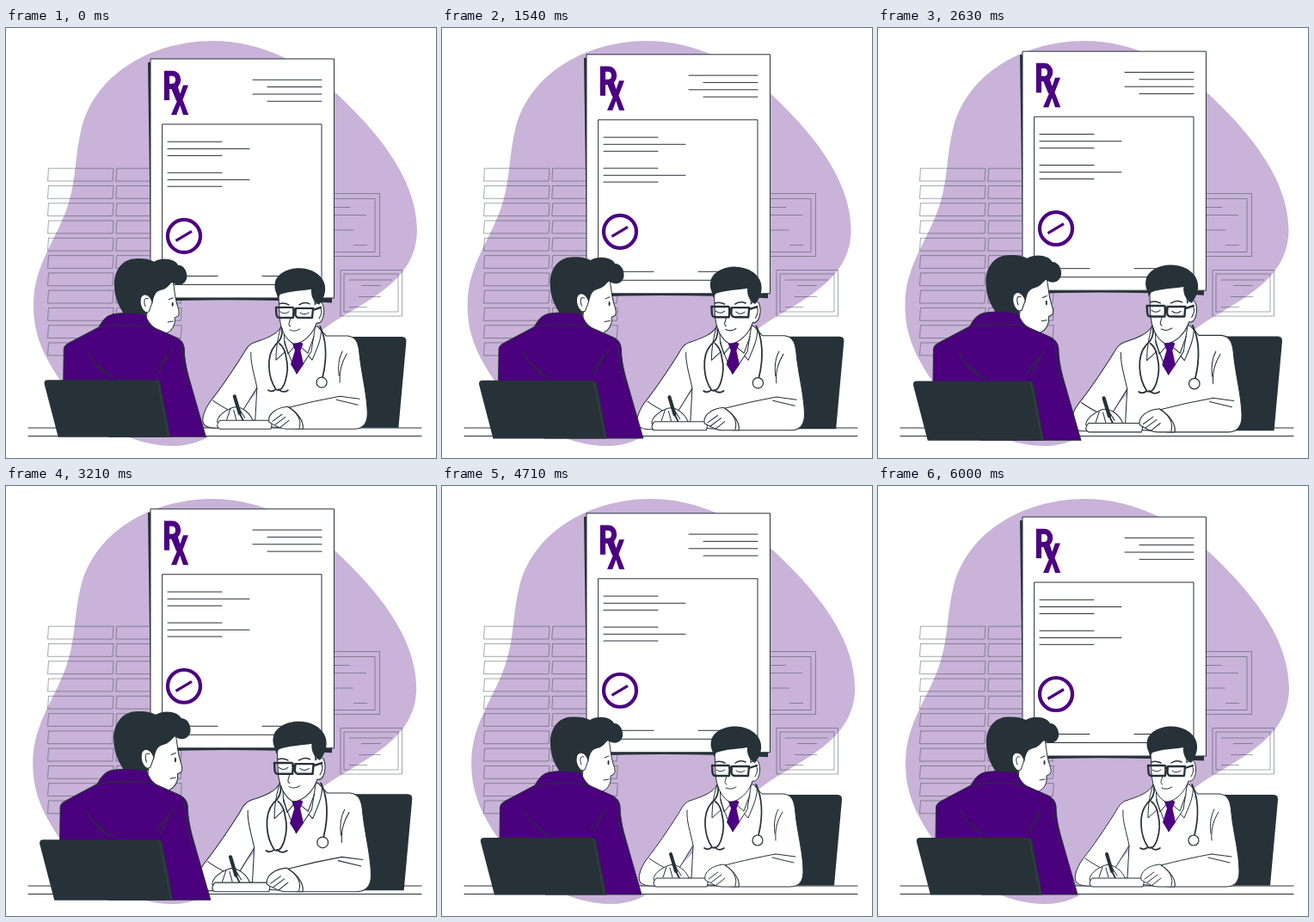
These frames come from a looping animation (500x500 px, 6.04 s). An HTML page:

```html
<!DOCTYPE html>
<html lang="en">
<head>
<meta charset="utf-8">
<title>Prescription</title>
<style>
html, body { margin: 0; width: 100%; height: 100%; overflow: hidden; background: #fff; }
svg { display: block; width: 100vw; height: 100vh; }
.line { fill: none; stroke: #263238; stroke-linecap: round; stroke-linejoin: round; }
.skin { fill: #fff; stroke: #263238; stroke-linejoin: round; }
.dark { fill: #263238; }
.plum { fill: #4b0082; }
.faint { fill: none; stroke: #263238; stroke-opacity: .42; }
</style>
</head>
<body>
<svg viewBox="0 0 500 500">
  <path id="blob" fill="#c9b3d9" d="M238 15C296 14 350 43 384 76C425 114 478 172 478 235C478 274 452 298 420 318C398 332 378 342 362 356C330 384 314 402 291 425C262 455 238 486 195 486C145 486 93 457 64 411C43 380 32 356 32 322C32 274 61 244 73 203C82 173 80 148 88 116C104 54 168 16 238 15Z"/>

  <path id="lockers" class="faint"/>
  <path class="faint" d="M360 192.500H434.500V265.500H360ZM360 198.500H429V260.500H360ZM375 208.500H400M375 217.500H419M375 235H404M404 252.500H420M389 281.500H460.500V335H389ZM393 286H456V330H393ZM399 293H449M413 299.500H436M410 312.500H436M399 324.500H420"/>

  <g id="sheet">
    <path class="dark" d="M165 40H381L379 319.500Q270 314 169 318Z"/>
    <path class="skin" d="M168 36H381.500V314H168Z"/>
    <path class="line" d="M182 112H367V298.500H182ZM287 60.300H367M304 68.600H367M287 77H367M304 85.300H367M188 132.300H251M188 140.500H283M188 148.500H251M188 168.300H251M188 176.500H283M188 184.300H251M192 288.500H246M298 288.500H357"/>
    <g fill="none" stroke="#4b0082">
      <path stroke-width="6.200" d="M187 84V52.800H193C202.500 52.800 202.500 68 193 68H187M194.500 68L201 84"/>
      <circle cx="207" cy="242" r="19" stroke-width="4.200"/>
      <path stroke-width="3.200" d="M197.500 247.500L216 236.500"/>
    </g>
    <path class="plum" d="M192 101L199.500 83.500L193 66.500H199.200L202.500 76.500L206 66.500H212L205.500 83.500L212.300 101H206L202.300 90L198.300 101Z"/>
  </g>

  <path fill="#fff" d="M26 465H483V474.500H26Z"/>
  <path class="line" d="M26 465H483M26 474.500H483"/>

  <g id="doctor">
    <path class="dark" d="M396 359H460Q465.500 359 465 365L456 464.500H400Z"/>
    <!-- coat, with the gap between arm and side -->
    <path class="skin" fill-rule="evenodd" d="M320 347C316 357 300 362 288 366C280 369 278 377 273 384C264 398 250 419 238 434C230 445 227 457 231 461C235 465 241 465 247 465L285 462L340 466H404C416 466 420 459 420 448C420 427 413 402 411 381C410 368 408 359 397 358L372 358L362 347ZM292 418L276 444L281 456H290Z"/>
    <path class="line" d="M285 377C284 390 289 402 292 418M391 376C386 385 386 396 387 404M396 379C390 389 387 398 388 412M388 428C371 431 348 436 329 441M388 428L411 431M384 432L409 438M241 433C249 439 257 443 263 446M330 442C339 448 346 456 345 465M320 347C316 360 314 370 314 386L325 376M366 348C368 360 361 374 356 386L348 377"/>
    <path class="skin" d="M323 346L324 367L338 402L355 376L360 344Z"/>
    <path class="line" d="M324 364L328 379L338 367L351 378L358 359"/>
    <path class="plum" d="M333 367L339 363.500L345.500 367L342.500 375L346 391L338 402L331 391L336 375Z"/>
    <path class="skin" d="M317 308L318 334C319 350 325 362 334 367C345 368 357 356 361 343C368 345 372 331 368 321C366 317 361 319 359 322L358 301Z"/>
    <path class="dark" d="M316 315C316 309 311 305 313 296C315 286 328 279 342 279.500C360 280 373 292 371 306C370 314 366 319 364 322C359 320 354 313 355 304C343 306 330 306 319 310Z"/>
    <path class="line" stroke-width="2.300" d="M314 325H333Q335 325 334.500 329L334 337H318Q315 337 314.500 333ZM337 326H357L356 337H341Q337 337 336.500 333ZM334 328H337M357 328L366 325"/>
    <path class="line" d="M319 330Q324 334 329 330M342 331Q347 335 352 331M331 337C330 342 327 346 331 347M330 351Q336 354 342 350M365 325Q369 330 364 338"/>
    <path class="line" stroke-width="1.500" d="M318 321Q323 319 329 322M341 322Q347 318 353 321"/>
    <g class="line" stroke-width="1.700">
      <path d="M321 350C322 359 318 365 313 369C302 382 305 407 314 420C323 426 330 400 326 384C325 376 322 370 318 367M314 420Q309 424 305 421M317 420Q322 425 328 421M365 347C372 361 374 382 368 406"/>
      <circle cx="367" cy="412" r="6" fill="#fff" stroke-width="1.200"/>
    </g>
    <path class="skin" d="M246 458C246 451 255 444 264 441C274 438 285 449 287 456L282 461H250Z"/>
    <path class="line" d="M261 443L257 455M265 444L268 455M271 442L278 453"/>
    <path class="line" stroke-width="4" d="M266 428L272 448"/>
    <path class="line" stroke-width="1.800" d="M272 448L276 456"/>
    <path class="skin" d="M249 456H306Q311 458 308 466H249Q243 463 249 456Z"/>
    <path class="skin" d="M306 458C304 449 314 441 328 440C338 446 347 457 345 466L326 466C319 466 313 462 306 458Z"/>
    <path class="line" d="M310 457L321 449M313 461L325 452M319 464L329 456M329 441C339 447 344 456 341 465"/>
  </g>

  <g id="patient">
    <path class="skin" d="M157 306L194 295C196 305 196 312 198 319C199 324 203 331 200 335L196 337L196 343C194 351 190 355 182 356L172 351L162 342L161 325Z"/>
    <path class="line" d="M164 330L163 341M188 342L194 341M189 316L194 314"/>
    <ellipse class="dark" cx="193.500" cy="321.500" rx="1" ry="2.800"/>
    <path class="skin" d="M170 319C170 310 159 306 156 315C154 324 159 333 166 330Z" stroke="none"/>
    <path class="line" d="M165 315C160 313 160 319 162 324"/>
    <path class="dark" d="M138 334C132 325 126 314 126 300C125 283 135 269 150 268.500C160 268 166 269 172 272C182 266 197 269 200 276C207 276 211 284 210 291C208 299 200 301 193 296C190 298 187 304 180 305C173 307 172 312 170 321C168 311 160 307 157 314C155 323 160 329 164 332L162 335Z"/>
    <path fill="#4b007d" stroke="#263238" d="M67 412L67.500 373Q68 369 74 366L108 348C112 341 116 335 124 333C136 331 150 331 162 333.500C164 340 168 346 173 349L198 360Q206 364 207 372C207 383 209 394 212 405L232 475H120Z"/>
    <path class="line" d="M109 348C126 344 150 345 165 347L173 349M96 377C101 389 110 401 126 406M107 391L119 404M193 374C186 382 179 390 173 399M187 382L177 402M203 366C204 384 207 398 212 414"/>
    <path class="dark" d="M49 409H174Q178.500 409 179.500 413L191 475.500H61L45 414Q44 409 49 409Z"/>
    <path fill="none" stroke="#4b5358" stroke-width=".6" d="M176 410L189 475"/>
  </g>
</svg>
<script>
const LOOP = 6040, CYCLE = 6000;
const $ = id => document.getElementById(id);

// Linear interpolation through [position, value] stops.
function track(stops, p) {
  const i = Math.max(1, stops.findIndex(s => s[0] >= p));
  const [a, from] = stops[i - 1], [b, to] = stops[i];
  return from + (to - from) * (p - a) / (b - a);
}

const shake = [0, -1, 2, -4, 4, -4, 4, -4, 2, -1, 0].map((x, i) => [i / 10, x]);
const beat = [[0, 1], [.1, 1.1], [.3, 1], [.4, 1], [.5, 1.1], [.6, 1], [1, 1]];
const float = [[0, 0], [.5, -10], [1, 0]];

let cells = '';
for (let row = 0; row < 11; row++) {
  const y = 163.2 + row * 20.28;
  for (const x of [49.5, 128.8]) cells += `M${x} ${y}h75.500l-1 14.800h-75.500z`;
}
$('lockers').setAttribute('d', cells);

const move = (id, x, y) => $(id).setAttribute('transform', `translate(${x} ${y})`);
const scale = (id, k, x, y) => $(id).setAttribute('transform',
  `translate(${x} ${y}) scale(${k}) translate(${-x} ${-y})`);

const start = performance.now();
function draw(now) {
  const t = Math.max(0, now - start) % LOOP;
  const p = Math.min(t + 20, CYCLE) / CYCLE;
  const k = track(beat, p);
  move('blob', track(shake, p * 2 % 1), 0);
  move('sheet', 0, track(float, p));
  scale('doctor', k, 347, 373);
  scale('patient', k, 138.5, 372);
  requestAnimationFrame(draw);
}
draw(start);
</script>
</body>
</html>
```
